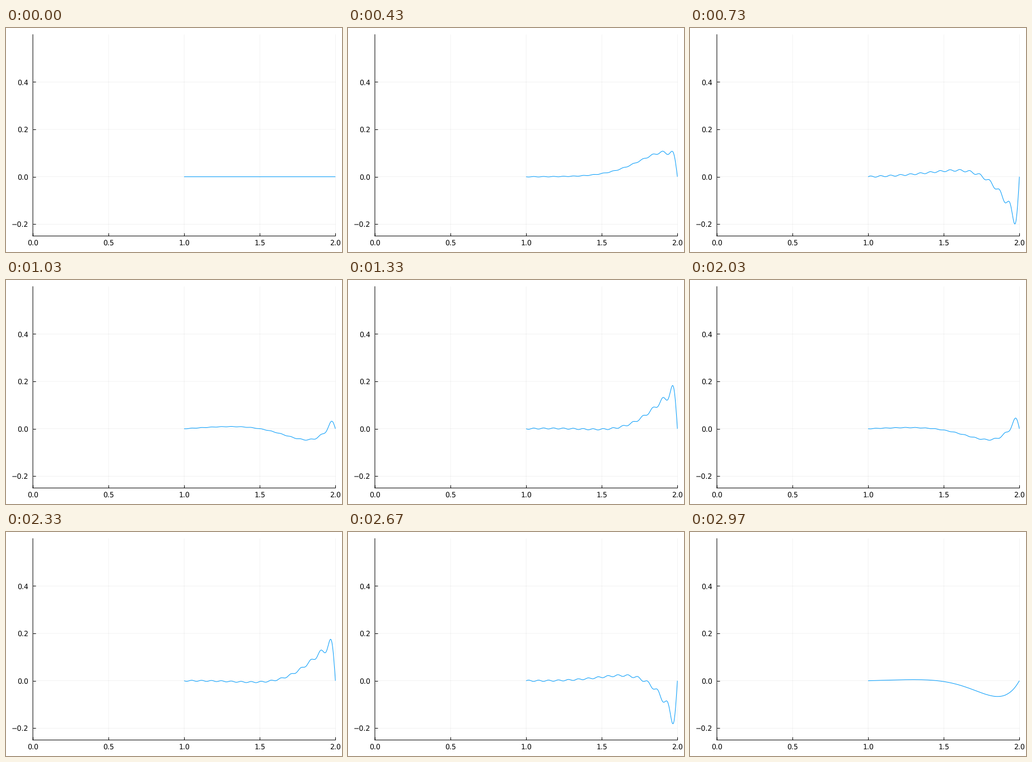
A matplotlib script for the animation above (3010 ms loop, 600x400 px).

```python
"""Heat diffusion in an annulus whose outer wall temperature oscillates."""
import numpy as np
import matplotlib.pyplot as plt
from matplotlib.animation import FuncAnimation

W, H, DPI = 600, 400, 100
PX = 72 / DPI                 # one pixel in points
TICK_MS, LOOP_MS = 10, 3010
STEPS, T_END = 90, 3.0
KAPPA, AMP, OMEGA, MODES = 0.1, 0.2, 2 * np.pi, 30

# Expand w = sqrt(r) * u in sines, so that w_t = kappa * (w_rr + w / (4 r^2)).
n = np.arange(1, MODES + 1)


def sines(r):
    return np.sin(np.pi * np.outer(n, r - 1))


quad = np.linspace(1, 2, 2001)
phi = sines(quad)
curvature = 2 * (phi / (4 * quad**2)) @ phi.T * (quad[1] - quad[0])
rates, vecs = np.linalg.eigh(KAPPA * (np.diag((n * np.pi) ** 2) - curvature))
wall = 2 * np.sqrt(2) * KAPPA * AMP * n * np.pi * (-1.0) ** (n + 1)
force = vecs.T @ wall

r = np.linspace(1, 2, 501)
shapes = vecs.T @ sines(r) / np.sqrt(r)


def profile(t):
    """Temperature over r at time t, starting from zero."""
    swing = rates * np.sin(OMEGA * t) - OMEGA * np.cos(OMEGA * t)
    decay = OMEGA * np.exp(-rates * t)
    return (force * (swing + decay) / (rates**2 + OMEGA**2)) @ shapes


plt.rcParams.update({"font.family": "DejaVu Sans", "text.hinting": "none",
                     "path.snap": False})
fig = plt.figure(figsize=(W / DPI, H / DPI), dpi=DPI, facecolor="white")
left, right, top, bottom = 48.0, 588.2, 11.8, 371.4
ax = fig.add_axes([left / W, 1 - bottom / H, (right - left) / W, (bottom - top) / H])
ax.set(xlim=(0, 2), ylim=(-0.25, 0.6),
       xticks=[0, 0.5, 1, 1.5, 2], yticks=[-0.2, 0, 0.2, 0.4])
ax.xaxis.set_major_formatter("{x:.1f}")
ax.yaxis.set_major_formatter("{x:.1f}")
ax.set_axisbelow(True)
ax.grid(color="black", alpha=0.1, linewidth=0.5 * PX)
for g in ax.get_xgridlines() + ax.get_ygridlines():
    g.set_clip_on(False)
ax.tick_params(direction="in", length=5 * PX, width=PX, labelsize=9)
ax.tick_params(axis="x", pad=7 * PX)
ax.tick_params(axis="y", pad=7.5 * PX)
ax.spines[["top", "right"]].set_visible(False)
ax.spines[["left", "bottom"]].set_linewidth(PX)

line, = ax.plot(r, profile(0), color="#009AFA", linewidth=PX,
                solid_capstyle="butt", clip_on=False)


def update(i):
    # The solution advances at 30 steps per second on a 10 ms clock.
    step = min(int((i + 0.5) * 0.3), STEPS - 1)
    line.set_ydata(profile(T_END * step / (STEPS - 1)))
    return line,


anim = FuncAnimation(fig, update, frames=LOOP_MS // TICK_MS, interval=TICK_MS,
                     repeat=True, repeat_delay=0)
plt.show()
```
